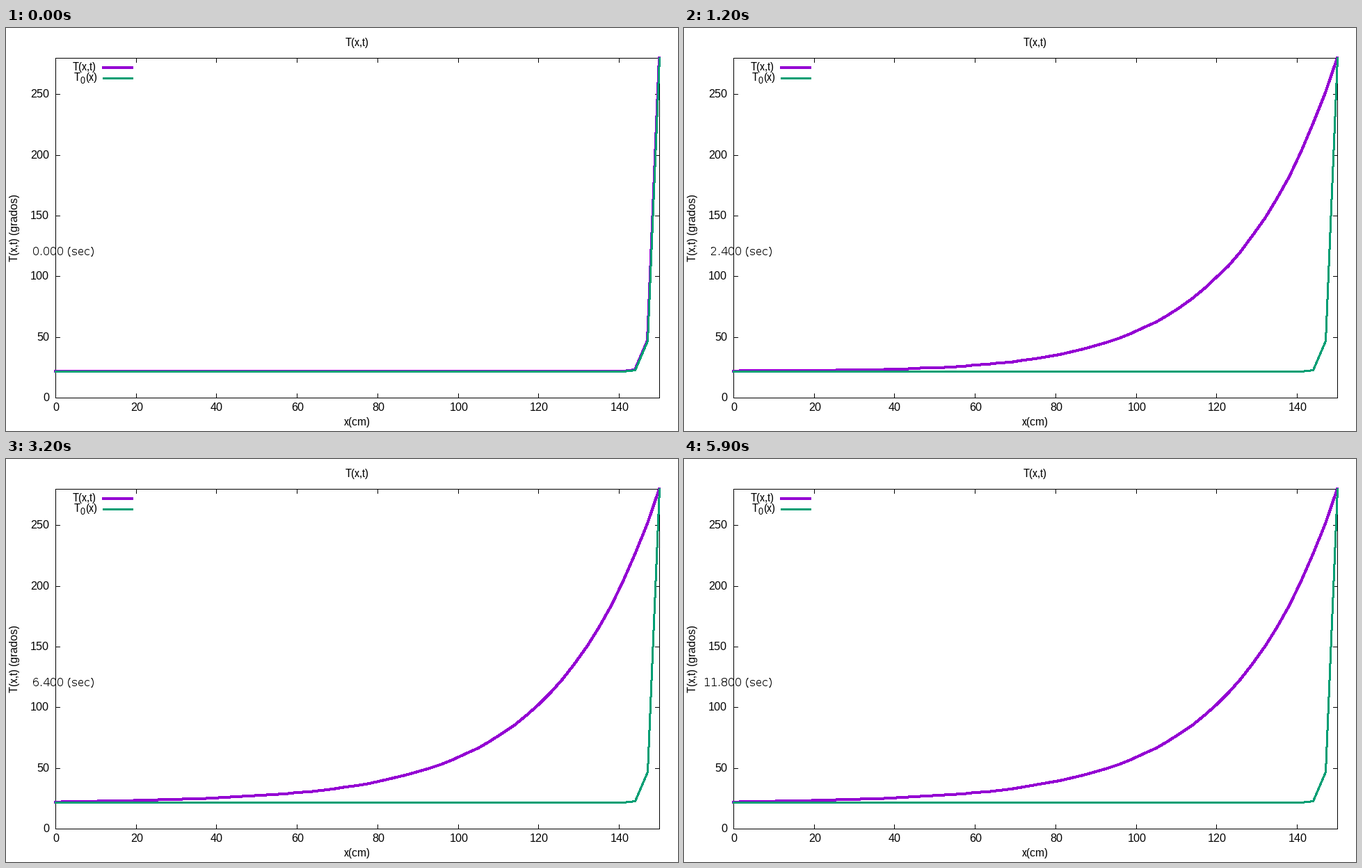
These frames come from a looping animation (966 px wide and 580 px high, 6 s). A matplotlib script:

```python
import numpy as np
import matplotlib.pyplot as plt
from matplotlib.animation import FuncAnimation

# Whole-pixel glyph advances
plt.rcParams["text.hinting"] = "default"
plt.rcParams["text.hinting_factor"] = 1

W, H, DPI = 966, 580, 64
FRAMES, INTERVAL = 60, 100
DT = 0.2                                 # simulated seconds per frame

LEFT, RIGHT, TOP, BOTTOM = 71, 939, 43, 532
X_MAX, T_MAX = 150, 280
COLD, HOT = 22, 280
DIFFUSION, DECAY = 485.0, 0.039          # cm^2/s, 1/cm
PURPLE, GREEN = "#9400d3", "#009e73"

fig = plt.figure(figsize=(W / DPI, H / DPI), dpi=DPI, facecolor="white")
ax = fig.add_axes([0, 0, 1, 1])
ax.set_xlim(0, W)
ax.set_ylim(H, 0)
ax.axis("off")


def pt(px):
    return px * 72 / DPI


def px_x(x):
    return np.rint(LEFT + np.asarray(x) * (RIGHT - LEFT) / X_MAX)


def px_y(temp):
    return np.rint(BOTTOM - np.asarray(temp) * (BOTTOM - TOP) / T_MAX)


def thin(xs, ys):
    """One-pixel black line through pixel centres."""
    ax.plot(np.asarray(xs) + 0.5, np.asarray(ys) + 0.5, color="black",
            lw=pt(1), snap=False, solid_capstyle="projecting",
            solid_joinstyle="miter")


def thick(xs, ys, color, width, cap="projecting"):
    """Hard-edged line; every touched pixel is filled, so stroke 1 px less."""
    shift = 0.5 * (width % 2)
    return ax.plot(np.asarray(xs) + shift, np.asarray(ys) + shift,
                   color=color, lw=pt(width - 1), antialiased=False,
                   snap=False, solid_capstyle=cap,
                   solid_joinstyle="miter")[0]


def text(x, y, s, ha="left", size=16, font="Liberation Sans", rotation=0):
    return ax.text(x, y, s, ha=ha, va="baseline", fontsize=pt(size),
                   family=font, color="black", rotation=rotation,
                   rotation_mode="anchor")


def start_profile(x):
    temp = np.full(x.shape, float(COLD))
    temp[-3:] = 23.1, 47.1, HOT
    return temp


def profile(x, t):
    """Rod with heat loss, its ends held at COLD and HOT."""
    if t == 0:
        return start_profile(x)
    ml = DECAY * X_MAX
    steady = np.sinh(DECAY * x) / np.sinh(ml)
    k = np.arange(1, 61)[:, None] * np.pi
    sign = -np.cos(k)
    coef = 2 * k * sign / (ml ** 2 + k ** 2)
    rate = DIFFUSION * (DECAY ** 2 + (k / X_MAX) ** 2)
    modes = coef * np.sin(k * x / X_MAX) * np.exp(-rate * t)
    return COLD + (HOT - COLD) * (steady - modes.sum(axis=0))


# Frame and ticks
thin([LEFT, RIGHT, RIGHT, LEFT, LEFT], [TOP, TOP, BOTTOM, BOTTOM, TOP])
for v in range(0, X_MAX, 20):
    x = px_x(v)
    thin([x, x], [BOTTOM, BOTTOM - 6])
    thin([x, x], [TOP, TOP + 6])
    text(x + 1, 551, str(v), "center")
for v in range(0, T_MAX, 50):
    y = px_y(v)
    thin([LEFT, LEFT + 6], [y, y])
    thin([RIGHT, RIGHT - 6], [y, y])
    text(62, y + 5, str(v), "right")

# Titles
text(504.5, 26, "T(x,t)", "center")
text(504.5, 572, "x(cm)", "center")
text(17, 288, "T(x,t) (grados)", "center", rotation=90)

# Key
text(96, 61, "T(x,t)")
text(98, 76, "T")
text(107, 80, "0", size=12.8)
text(114, 76, "(x)")
thick([138.5, 182.5], [57, 57], PURPLE, 4, "butt")
thick([138.5, 182.5], [72, 72], GREEN, 3, "butt")

# Curves
grid = np.arange(0, X_MAX + 1, 3)
grid_px = px_x(grid)
curve = thick(grid_px, px_y(start_profile(grid)), PURPLE, 4)
thick(grid_px, px_y(start_profile(grid)), GREEN, 3)
clock = text(38, 327, "", font="DejaVu Sans")


def update(i):
    t = i * DT
    curve.set_ydata(px_y(profile(grid, t)))
    clock.set_text(f"{t:.3f} (sec)")
    clock.set_x(38 if i < 50 else 28)
    return curve, clock


anim = FuncAnimation(fig, update, frames=FRAMES, interval=INTERVAL,
                     repeat=True, repeat_delay=0)
plt.show()
```
